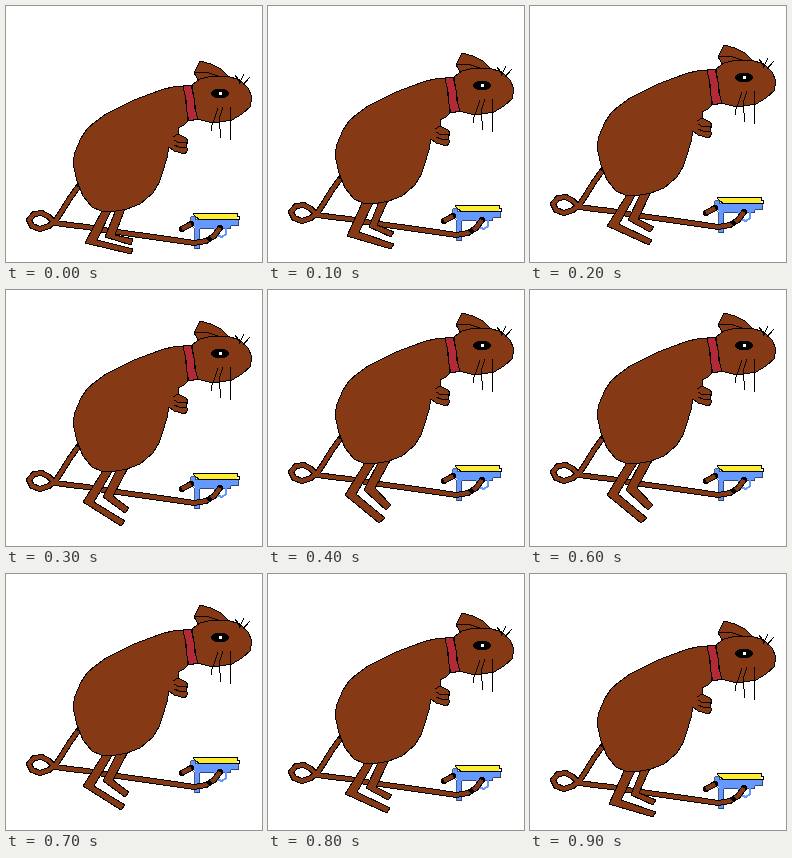
Recreate the animation shown at these times as an HTML page without scripts. Size 256 by 256 pixels, loop 1 s.

```html
<!DOCTYPE html>
<html lang="en">
<head>
<meta charset="utf-8">
<title>Bobbing rat</title>
<style>
html, body { margin: 0; width: 100%; height: 100%; overflow: hidden; background: #fff; }
svg { display: block; width: 100vw; height: 100vh; shape-rendering: crispEdges; }
.fur, .legs { fill: #853914; stroke: #000; stroke-linejoin: round; }
.line { fill: none; stroke: #000; }
.rope { fill: none; stroke: #853914; stroke-width: 4; stroke-linejoin: round; }
.edge { stroke: #000; stroke-width: 6; stroke-linecap: round; }
.blue { fill: #69f; stroke: #235; stroke-width: .8; }
.bob { animation: bob 1s steps(5, end) infinite; }
.legs { animation: crouch 1s step-end infinite; }

@keyframes bob {
  0%, 100% { transform: translateY(0); }
  50% { transform: translateY(-40px); }
}
/* Each leg: hip, heel, sole, toe, ankle, hip */
@keyframes crouch {
  0%, 100% { d: path("M111 201L99 231L125 239L127 233L109 229L120 200M97 203L79 237L125 248L127 243L91 234L106 203"); }
  10%, 90% { d: path("M112 193L101 221L123 231L126 226L109 219L121 192M95 195L79 230L123 243L126 238L91 226L106 195"); }
  20%, 80% { d: path("M112 185L98 214L120 226L124 221L108 213L122 184M98 187L77 220L119 239L122 234L89 218L107 186"); }
  30%, 70% { d: path("M112 177L97 207L119 223L123 218L107 206L123 176M98 179L77 212L115 236L119 231L88 212L108 178"); }
  40%, 60% { d: path("M112 169L96 200L118 220L123 215L107 198L124 167M98 171L77 205L111 233L117 228L88 204L109 170"); }
  50% { d: path("M113 161L95 193L116 217L121 212L106 191L125 159M99 163L77 197L106 230L113 225L88 196L110 162"); }
}
</style>
</head>
<body>
<svg viewBox="0 0 256 256">
  <defs>
    <path id="tail" d="M72 181L64 192L56 205L50 214L43 220L34 223L26 220L23 214L28 208L36 207L43 211L49 217L64 219L81 221L104 225L140 230L168 234L188 237L200 235L208 230L214 222"/>
    <path id="tip" d="M176 223L185 218"/>
  </defs>

  <g class="bob">
    <path class="blue" d="M184.500 210.500H189.500V213.500H232.500V219.500H224.500V222.500H193.500V242.500H188.500V221.500L184.500 217.500Z"/>
    <path class="line" style="stroke:#69f;stroke-width:2" d="M209 222L210 229L216 231L220 228V222"/>
    <path fill="#fbee32" d="M187 207H231V214H193Z"/>
    <path class="line" d="M187 207.500H231.500V210.500H233.500V213.500H193L187 208"/>
    <use href="#tail" class="rope edge"/>
    <use href="#tip" class="rope edge"/>
    <use href="#tail" class="rope"/>
    <use href="#tip" class="rope"/>
    <path d="M200 232L204 230L207 234L203 236Z"/>
  </g>

  <path class="legs" d="M111 201L99 231L125 239L127 233L109 229L120 200M97 203L79 237L125 248L127 243L91 234L106 203"/>

  <g class="bob">
    <path class="fur" d="M178 80L167 81L158 83L144 88L128 94L112 102L100 108L89 116L81 123L75 132L69 146L67 157L71 175L77 190L86 201L95 205L105 206L121 203L134 198L147 187L153 177L157 165L161 152L163 141L168 145L179 148L182 144L180 140L182 135L180 132L172 128L172 122L178 119L182 115Z"/>
    <path class="line" d="M172 128L167 131M168 134L173 137L181 136M168 139L173 141L181 141"/>
    <path class="fur" d="M193 75L188 67L194 55L205 58L215 63L223 71Z"/>
    <path class="line" d="M188 67L200 66L212 70"/>
    <path class="fur" d="M186 79L194 73L206 70L221 70L234 74L242 82L246 91L244 101L236 108L226 114L214 116L203 116L191 113Z"/>
    <path fill="#b22a35" stroke="#000" d="M177 80L185 79L188 92L189 103L192 113L183 115L181 106L180 94Z"/>
    <ellipse cx="214" cy="87.500" rx="9" ry="5"/>
    <ellipse cx="214.500" cy="87.500" rx="2" ry="1.300" fill="#fff"/>
    <path class="line" d="M212 102L209 111L206 119L205 125M217 101L213 113L215 132M224.500 101V134M235 77L229 69M233 78L238 68M237 79L244 71"/>
  </g>
</svg>
</body>
</html>
```
